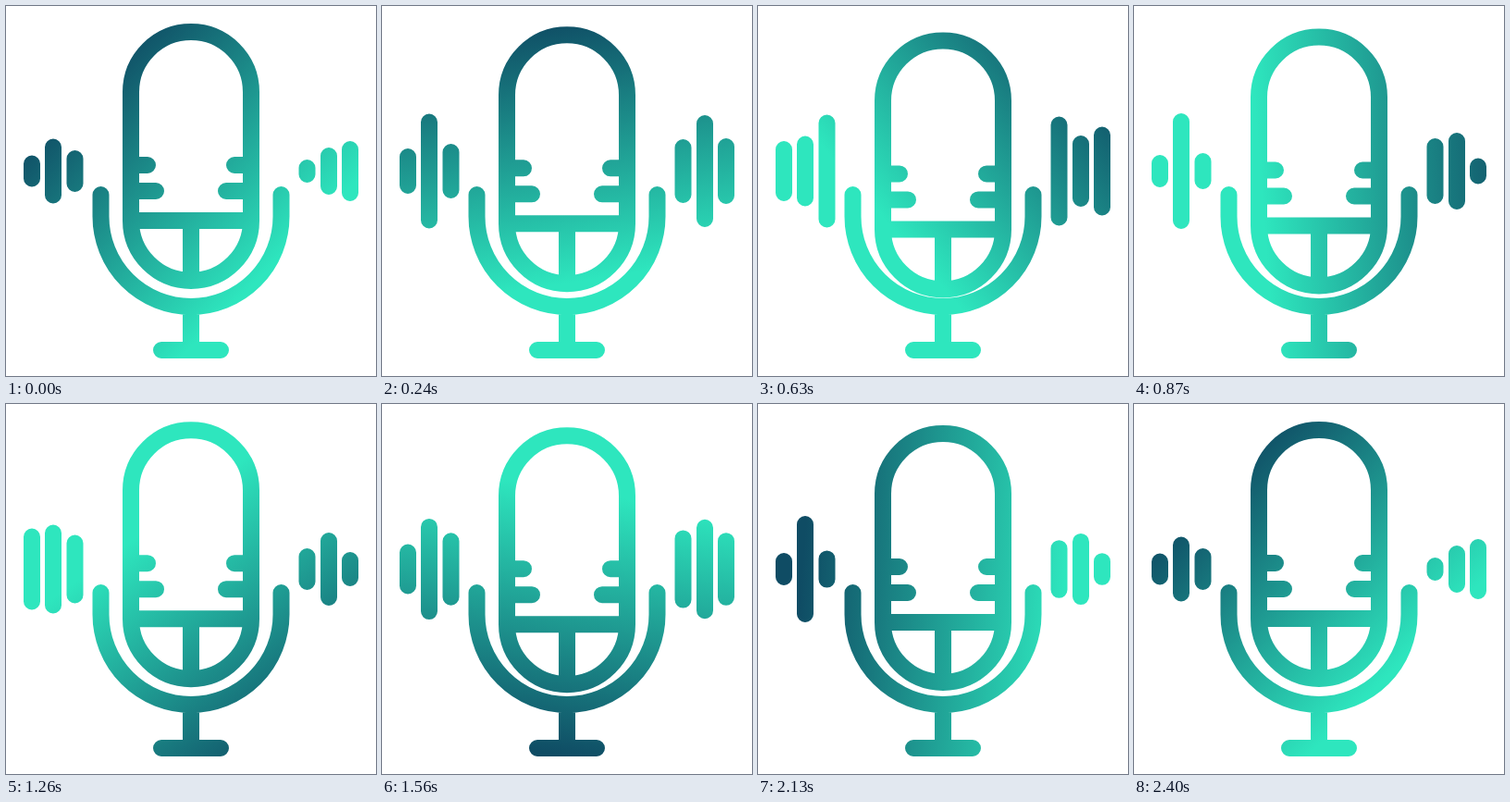
Write an HTML page that moves like this. It is 400x400 px and loops after 2430 ms.

```html
<!DOCTYPE html>
<html lang="en">
<head>
<meta charset="utf-8">
<title>Podcast microphone</title>
<style>
  html, body { margin: 0; height: 100%; overflow: hidden; background: #fff; }
  svg { display: block; width: 100%; height: 100%; }
</style>
</head>
<body>
<svg viewBox="0 0 400 400">
  <defs>
    <linearGradient id="teal" gradientUnits="userSpaceOnUse">
      <stop offset="0" stop-color="#0f4c64"/>
      <stop offset="1" stop-color="#2ee6be"/>
    </linearGradient>
  </defs>
  <g fill="none" stroke="url(#teal)" stroke-width="18" stroke-linecap="round">
    <path id="mic"/>
    <path d="M102.5 204V227.5a97.5 97.5 0 0 0 195 0V204M200 325V372M168 372H232"/>
    <path id="bars"/>
  </g>
</svg>
<script>
const LOOP = 2430, TURN = 2400, BEAT = 1200, STEP = 30;
const BAR_Y = 178.5, CAP = 9;
const PIVOT = { x: 235, y: 196 }, DARK = 188, LIGHT = -97;

// Bar heights at each moment of the beat
const TIMES = [0, 60, 240, 630, 690, 870, BEAT];
const BARS = [
  { x: 28,    heights: [34, 88, 49, 65, 42, 35] },
  { x: 51,    heights: [70, 96, 124, 76, 76, 125] },
  { x: 74.5,  heights: [45, 74, 59, 122, 98, 39] },
  { x: 325.5, heights: [25, 45, 69, 118, 127, 71] },
  { x: 349,   heights: [51, 79, 121, 77, 78, 83] },
  { x: 372,   heights: [65, 37, 71, 96, 90, 28] }
];

const [teal, mic, bars] = ["teal", "mic", "bars"].map(id => document.getElementById(id));

function heightAt(heights, time) {
  const i = TIMES.findIndex(end => end > time) - 1;
  const mix = (time - TIMES[i]) / (TIMES[i + 1] - TIMES[i]);
  const next = heights[(i + 1) % heights.length];
  return heights[i] + (next - heights[i]) * mix;
}

function micPath(dy) {
  const y = base => base + dy;
  return `M135 ${y(93)}a65 65 0 0 1 130 0V${y(232)}a65 65 0 0 1 -130 0Z` +
    `M135 ${y(232)}H265M200 ${y(232)}V${y(297)}` +
    `M135 ${y(172)}H153M135 ${y(200)}H162M265 ${y(172)}H247M265 ${y(200)}H238`;
}

function barPath({ x, heights }, time) {
  const half = heightAt(heights, time) / 2 - CAP;
  return `M${x} ${BAR_Y - half}V${BAR_Y + half}`;
}

function turnGradient(angle) {
  [DARK, LIGHT].forEach((distance, i) => {
    teal.setAttribute("x" + (i + 1), PIVOT.x + distance * Math.cos(angle));
    teal.setAttribute("y" + (i + 1), PIVOT.y + distance * Math.sin(angle));
  });
}

function draw() {
  const time = Math.floor(performance.now() % LOOP / STEP) * STEP;
  const bob = 4.75 * (1 - Math.cos(2 * Math.PI * time / BEAT));
  turnGradient(2 * Math.PI * (0.625 + time / TURN));
  mic.setAttribute("d", micPath(bob));
  bars.setAttribute("d", BARS.map(bar => barPath(bar, time % BEAT)).join(""));
  requestAnimationFrame(draw);
}
draw();
</script>
</body>
</html>
```
